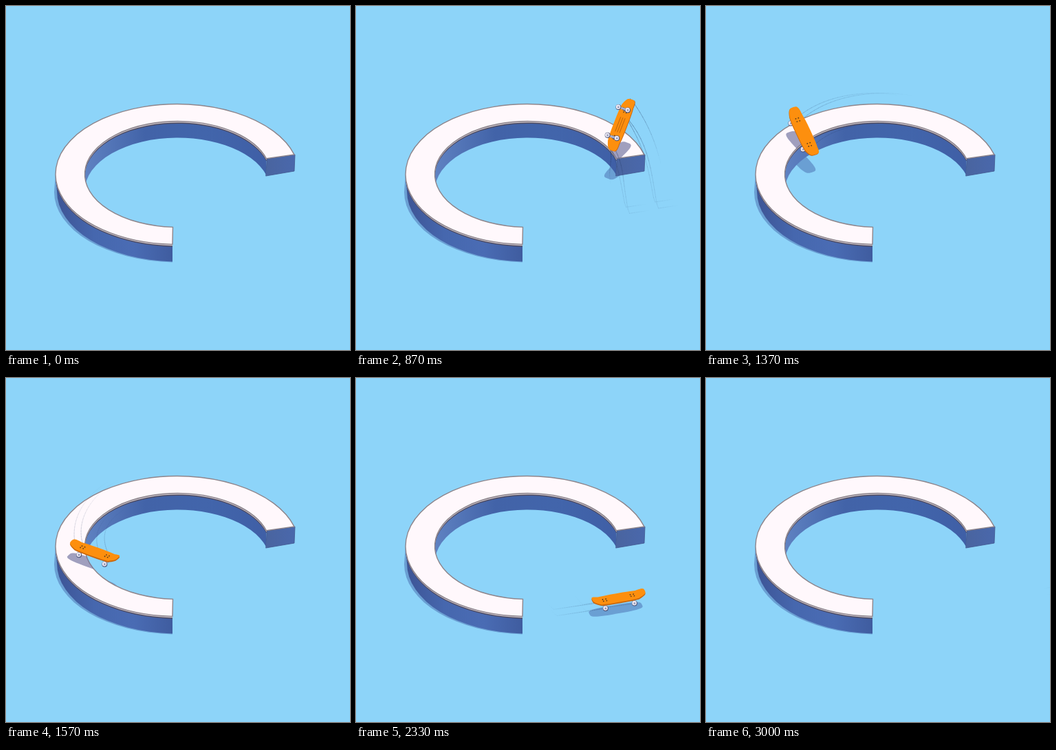
Recreate the animation shown at these times as an HTML page with a canvas. Size 500 by 500 pixels, loop 3.03 s.

```html
<!DOCTYPE html>
<html lang="en">
<head>
<meta charset="utf-8">
<title>Skateboard on a ring</title>
<style>
html, body { margin: 0; width: 100%; height: 100%; overflow: hidden; background: #8dd4f9; }
canvas { display: block; width: 500px; height: 500px; }
</style>
</head>
<body>
<canvas id="stage" width="500" height="500"></canvas>
<script>
const c = document.getElementById('stage').getContext('2d');
const { PI, sin, cos, abs, sign, min, max } = Math;
const rad = deg => deg * PI / 180;

const LOOP = 3030, STEP = 100 / 3, TRAIL = 260;
const POP = 700, RAIL = 1000, LEAP = 1570, LAND = 2110;
const FLAT = 0.578, RISE = 0.816;        // view from above: depth and height scale
const CX = 249, CY = 244.5, WALL = 24, RIDE = 12;
const LENGTH = 40, WIDTH = 11, AXLE = 9;

const part = (t, a, b) => min(1, max(0, (t - a) / (b - a)));
const ramp = (t, a, b) => { const s = part(t, a, b); return s * s * (3 - 2 * s); };
const mix = (a, b, s) => a + (b - a) * s;

// Where the board is: floor point and height above it, in stage pixels.
function roll(t, t0, x0, y0, speed) {
  const dx = (t - t0) * speed;
  return { x: x0 + dx, y: y0 - 0.15 * dx, h: RIDE };
}
const rollIn = t => roll(t, POP, 415, 298, -0.35);
const rollOut = t => roll(t, LAND, 310, 342, 0.32);

function slide(t) {
  const a = rad(-88 - 0.2725 * (t - 1170));
  const r = 156 * (0.95 - 0.15 * ramp(t, 1170, LEAP));
  return { x: CX + r * cos(a), y: CY + WALL + r * FLAT * sin(a), h: WALL + RIDE };
}

function hop(t, t0, t1, from, to, arc) {
  const s = part(t, t0, t1), a = from(t0), b = to(t1);
  return {
    x: mix(a.x, b.x, s),
    y: mix(a.y, b.y, sin(s * PI / 2)),
    h: mix(a.h, b.h, s) + 4 * arc * s * (1 - s)
  };
}

function position(t) {
  if (t < POP) return rollIn(t);
  if (t < RAIL) return hop(t, POP, RAIL, rollIn, slide, 35);
  if (t < LEAP) return slide(t);
  if (t < LAND) return hop(t, LEAP, LAND, slide, rollOut, 45);
  return rollOut(t);
}

// Board axes in space: along, across and down, turned by yaw, pitch and flip.
function axes(t) {
  const yaw = rad(-17 - 73 * ramp(t, POP, RAIL) - 58 * ramp(t, 1170, LEAP) + 131 * ramp(t, 1780, LAND));
  const pitch = rad(45) * (ramp(t, POP, 850) - ramp(t, 1250, LEAP) + ramp(t, LEAP, 1800) - ramp(t, 1900, LAND));
  const flip = rad(360 * ramp(t, POP, 1040) + 25 * sin(PI * part(t, LEAP, LAND)));
  const along = [cos(yaw) * cos(pitch), sin(yaw) * cos(pitch), sin(pitch)];
  const side = [-sin(yaw), cos(yaw), 0];
  const up = [-cos(yaw) * sin(pitch), -sin(yaw) * sin(pitch), cos(pitch)];
  const across = side.map((v, i) => v * cos(flip) - up[i] * sin(flip));
  const down = up.map((v, i) => -v * cos(flip) - side[i] * sin(flip));
  return [along, across, down];
}

function poseAt(t) {
  const [along, across, down] = axes(t), spot = position(t);
  const view = (v, k) => [v[0] * k, (v[1] * FLAT - v[2] * RISE) * k];
  const floor = (v, k) => [v[0] * k, v[1] * FLAT * k];
  return {
    x: spot.x, y: spot.y - spot.h, h: spot.h,
    u: view(along, LENGTH), w: view(across, WIDTH), n: view(down, AXLE),
    shadow: { x: spot.x - 4, y: spot.y + 5, u: floor(along, LENGTH), w: floor(across, WIDTH), n: [0, 0] }
  };
}

const place = (p, s, v, n) => [
  p.x + p.u[0] * s + p.w[0] * v + p.n[0] * n,
  p.y + p.u[1] * s + p.w[1] * v + p.n[1] * n
];

function outline(p, n, bend) {
  c.beginPath();
  for (let i = 0; i < 48; i++) {
    const a = i / 24 * PI, x = cos(a), y = sin(a);
    const s = sign(x) * abs(x) ** 0.7, v = sign(y) * abs(y) ** 0.5;
    const lift = max(0, abs(s) - 0.7) / 0.3 * bend;
    c.lineTo(...place(p, s, v, n - lift));
  }
  c.closePath();
}

function fill(color) { c.fillStyle = color; c.fill(); }
function stroke(color, width) { c.strokeStyle = color; c.lineWidth = width; c.stroke(); }
function line(a, b) { c.beginPath(); c.moveTo(...a); c.lineTo(...b); }
function dot([x, y], r, color) { c.beginPath(); c.arc(x, y, r, 0, 7); fill(color); }
function shade(x0, x1, ...colors) {
  const g = c.createLinearGradient(x0, 0, x1, 0);
  colors.forEach((col, i) => g.addColorStop(i / (colors.length - 1), col));
  return g;
}

const outer = (from, to, dy = 0, ccw = true, r = 177) => c.ellipse(CX, CY + dy, r, 102, 0, from, to, ccw);
const inner = (from, to, dy = 0, ccw = true) => c.ellipse(CX + 0.5, CY + dy, 135, 77, 0, from, to, ccw);
const FRONT = PI / 2 + 0.04;

function ringTop(dy = 0) {
  c.beginPath();
  outer(-0.284, FRONT, dy);
  inner(FRONT + 0.012, -0.3, dy, false);
  c.closePath();
}

function outerBand(depth, r, color) {
  c.beginPath();
  outer(FRONT, PI, 0, false);
  outer(PI, FRONT, depth, true, r);
  c.closePath();
  fill(color);
}

function drawRing() {
  outerBand(WALL + 2, 179, '#6a9fd3');
  outerBand(WALL + 1, 175, shade(71, 243, '#3d5494', '#4667ae', '#4a6cb4', '#3f5c9f'));

  c.beginPath();
  inner(-0.3, PI - 0.2);
  inner(PI - 0.2, -0.3, WALL, false);
  c.closePath();
  fill(shade(114, 380, '#5f82c2', '#4263a8', '#4265ab', '#3f5fa6'));

  ringTop(3.5);
  fill('#4c4a61');
  ringTop(2);
  fill('#c9c1c8');

  c.beginPath();
  [[379, 222], [420, 216], [419, 240], [378, 247]].forEach(q => c.lineTo(...q));
  c.closePath();
  fill(shade(378, 420, '#49649f', '#4a68ac'));
  stroke('#41578f', 0.8);

  ringTop();
  fill('#fff8fc');
  stroke('#8d858c', 1.4);
}

function drawShadow(p, raise, color) {
  outline({ ...p.shadow, y: p.shadow.y - raise }, 0, 0);
  fill(color);
}

const ends = [-0.55, 0.55], sides = [-0.75, 0.75];
const wheels = ends.flatMap(s => sides.map(v => [s, v, 1]));
const marks = [...wheels, [-1, 0, 0], [1, 0, 0]];

function drawTrails(t) {
  for (let age = TRAIL; age > 0; age -= 10) {
    const a = poseAt(t - age), b = poseAt(t - age + 10);
    const air = part(b.h, WALL + RIDE, 60);
    for (const m of marks) {
      const alpha = (m[2] ? 0.3 + 0.45 * air : 0.6 * air) * (1 - age / TRAIL);
      line(place(a, ...m), place(b, ...m));
      stroke(`rgba(38,58,100,${alpha.toFixed(3)})`, 0.8);
    }
  }
}

function drawWheels(p) {
  for (const s of ends) {
    line(place(p, s, 0, 0), place(p, s, 0, 1));
    stroke('#46527f', 4);
    line(place(p, s, sides[0], 1), place(p, s, sides[1], 1));
    stroke('#aab2cc', 3);
  }
  for (const m of wheels) {
    const [x, y] = place(p, ...m);
    dot([x, y], 4, '#4a5276');
    dot([x - 0.3, y - 0.3], 3.3, '#e9e6f2');
    dot([x, y], 1.3, '#8d93b2');
  }
}

function drawBoard(p) {
  const under = p.u[0] * p.w[1] - p.u[1] * p.w[0] < 0;
  if (!under) drawWheels(p);
  outline(p, under ? -0.2 : 0.25, 0.5);
  fill('#c9660c');
  outline(p, 0, 0.5);
  fill('#fd8f0e');
  for (const s of ends)
    for (const ds of [-0.06, 0.06])
      for (const v of [-0.2, 0.2])
        dot(place(p, s * 0.95 + ds, v, 0), 0.9, '#5a3a1c');
  if (under) {
    for (const v of [-0.35, 0, 0.35]) {
      line(place(p, -0.3, v, 0), place(p, 0.25, v, 0));
      stroke('rgba(110,50,10,.5)', 0.9);
    }
    drawWheels(p);
  }
}

function draw(t) {
  const p = poseAt(t);
  c.fillStyle = '#8dd4f9';
  c.fillRect(0, 0, 500, 500);
  drawShadow(p, 0, '#6a9fd3');
  drawRing();
  c.save();
  ringTop();
  c.clip();
  drawShadow(p, WALL, 'rgba(98,100,150,.6)');
  c.restore();
  drawTrails(t);
  drawBoard(p);
}

c.lineCap = 'round';
const start = performance.now();
function tick() {
  const t = (performance.now() - start) % LOOP;
  draw(Math.floor((t + 3.4) / 33.3) * STEP);
  requestAnimationFrame(tick);
}
tick();
</script>
</body>
</html>
```
